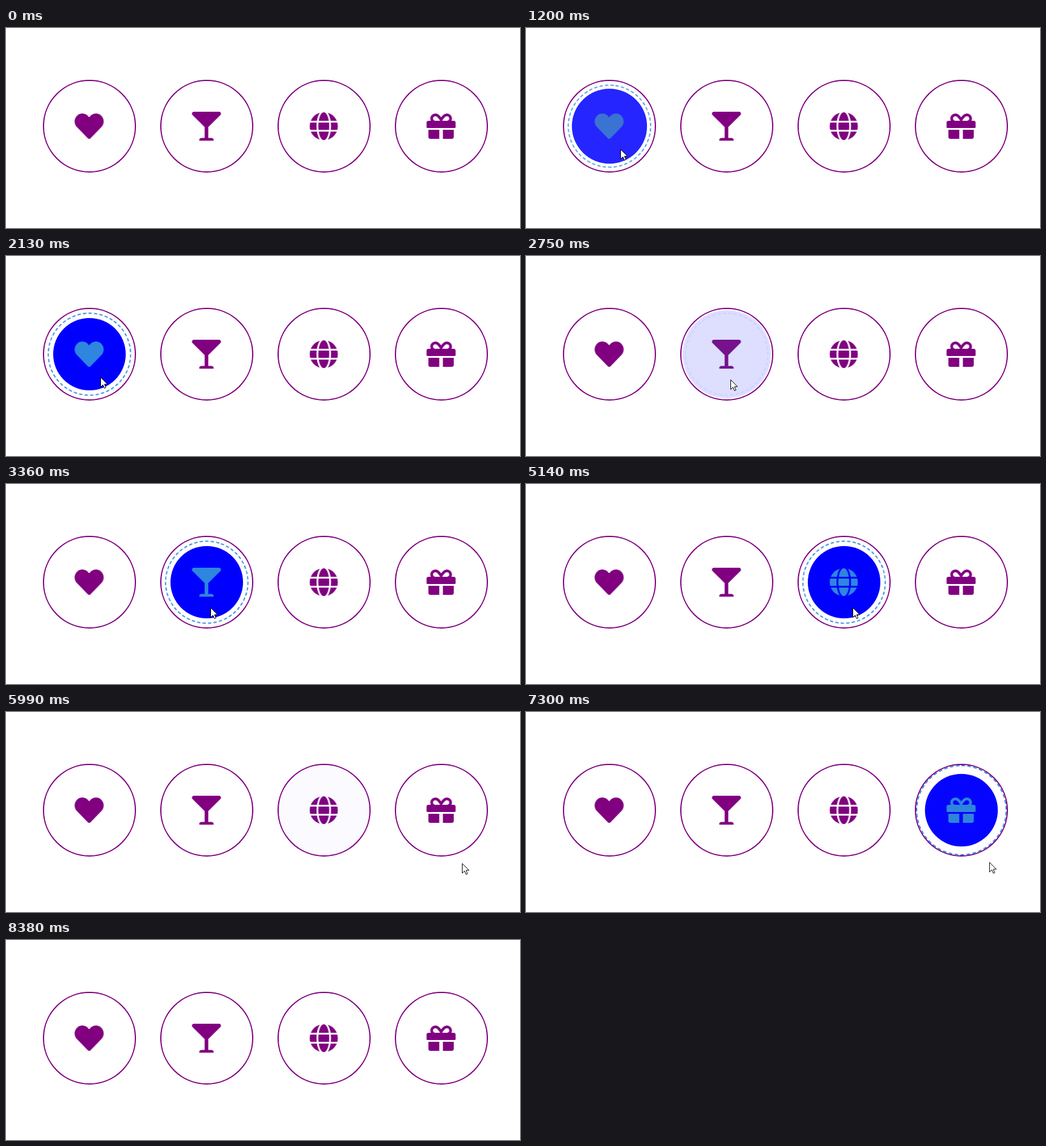
An HTML page that plays this animation: 850 by 332 pixels, repeating every 8.54 s.

```html
<!DOCTYPE html>
<html lang="en">
<head>
<meta charset="utf-8">
<title>Icon hover</title>
<style>
  html, body { margin: 0; width: 100%; height: 100%; overflow: hidden; background: #fff; }
  svg { display: block; }
  .border { fill: none; stroke: #800080; stroke-width: 2; }
  .disc { fill: #00f; r: 75px; opacity: 0; }
  .ring { fill: none; stroke: #2e86de; stroke-width: 2; stroke-dasharray: 6 3.893; opacity: 0; }
  .icon { fill: #800080; }
  .cursor { fill: #fff; stroke: #000; stroke-width: 1; }
</style>
</head>
<body>
<svg width="850" height="332" viewBox="0 0 850 332">
  <defs>
    <mask id="grid" maskUnits="userSpaceOnUse" x="0" y="0" width="512" height="512">
      <rect width="512" height="512" fill="#fff"/>
      <ellipse cx="256" cy="256" rx="128" ry="285"/>
      <ellipse cx="256" cy="256" rx="96" ry="248" fill="#fff"/>
      <path d="M0 176H512M0 336H512" stroke="#000" stroke-width="32"/>
    </mask>
  </defs>
  <g id="buttons"></g>
  <path class="cursor" id="cursor" d="M.5 .5V16.5L4.3 12.9 6.8 18.6 9.2 17.5 6.8 11.9H11.8Z"/>
</svg>
<script>
const LOOP = 8540, FADE = 500, SPIN = 12000;

const heart = `<path d="M462.3 62.6C407.5 15.9 326 24.3 275.7 76.2L256 96.5l-19.7-20.3C186.1 24.3 104.5 15.9 49.7 62.6
  c-62.8 53.6-66.1 149.8-9.9 207.9l193.5 199.8c12.5 12.9 32.8 12.9 45.3 0l193.5-199.8c56.3-58.1 53-154.3-9.8-207.9z"/>`;
const glass = `<path d="M502 57.6C523.3 36.3 508.2 0 478.2 0H33.8C3.8 0-11.3 36.3 10 57.6L224 271.6V464h-56
  c-22 0-40 18-40 40 0 4.4 3.6 8 8 8h240c4.4 0 8-3.6 8-8 0-22-18-40-40-40h-56V271.6z"/>`;
const globe = `<circle cx="256" cy="256" r="248" mask="url(#grid)"/>`;
const gift = `<path d="M32 448c0 17.7 14.3 32 32 32h160V320H32zM288 480h160c17.7 0 32-14.3 32-32V320H288z
  M480 160h-42.1c6.2-12.1 10.1-25.5 10.1-40 0-48.5-39.5-88-88-88-41.6 0-68.5 21.3-103 68.3-34.5-47-61.4-68.3-103-68.3
  -48.5 0-88 39.5-88 88 0 14.5 3.8 27.9 10.1 40H32c-17.7 0-32 14.3-32 32v80c0 8.8 7.2 16 16 16h480c8.8 0 16-7.2 16-16v-80
  c0-17.7-14.3-32-32-32zm-326.1 0c-22.1 0-40-17.9-40-40s17.9-40 40-40c19.9 0 34.6 3.3 86.1 80z
  m206.1 0h-86.1c51.4-76.5 65.7-80 86.1-80 22.1 0 40 17.9 40 40s-17.9 40-40 40z"/>`;

const buttons = [
  { icon: heart, enter: 920, leave: 2240 },
  { icon: glass, enter: 2690, leave: 4070 },
  { icon: globe, enter: 4510, leave: 5585 },
  { icon: gift, enter: 6295, leave: 7285 },
];

// Pointer moves; sag is how far a move bows below the straight line
const moves = [
  { start: 70, end: 870, x: 117, y: 262, sag: 9 },
  { start: 870, end: 1020, x: 156, y: 201, sag: 0 },
  { start: 2136, end: 2750, x: 338, y: 205, sag: 58 },
  { start: 3950, end: 4580, x: 540, y: 205, sag: 69 },
  { start: 5525, end: 5990, x: 754, y: 251, sag: 60 },
  { start: 5990, end: 6700, x: 747, y: 212, sag: 0 },
  { start: 7210, end: 7300, x: 766, y: 249, sag: 0 },
  { start: 7300, end: 7840, x: 819, y: 340, sag: 0 },
];

function play(el, steps) {
  const frames = steps.map(([time, style, easing = 'linear']) => ({ ...style, offset: time / LOOP, easing }));
  el.animate(frames, { duration: LOOP, iterations: Infinity });
}

function hover(el, { enter, leave }, off, on) {
  play(el, [
    [0, off], [enter, off, 'ease'], [enter + FADE, on],
    [leave, on, 'ease'], [leave + FADE, off], [LOOP, off],
  ]);
}

// The ring shrinks at once and turns steadily while hovered
function spin(el, { enter, leave }) {
  const pose = (angle, scale) => ({ transform: `rotate(${angle - 90}deg) scale(${scale})` });
  const rest = pose(0, 1);
  play(el, [
    [0, rest], [enter, rest],
    [enter, pose(0, .92)], [leave, pose((leave - enter) / SPIN * 360, .92)],
    [leave, rest], [LOOP, rest],
  ]);
}

function movePointer(el, from) {
  const place = (x, y) => ({ transform: `translate(${x}px, ${y}px)` });
  const hidden = place(from.x, 340);
  const steps = [[0, hidden], [moves[0].start, hidden]];
  const samples = 12;
  for (const to of moves) {
    for (let i = 0; i <= samples; i++) {
      const u = i / samples;
      const x = from.x + (to.x - from.x) * (1 - Math.cos(Math.PI * u)) / 2;
      const y = from.y + (to.y - from.y) * u + to.sag * Math.sin(Math.PI * u);
      steps.push([to.start + (to.end - to.start) * u, place(x, y)]);
    }
    from = to;
  }
  play(el, [...steps, [LOOP, place(from.x, from.y)]]);
}

const holder = document.getElementById('buttons');
holder.innerHTML = buttons.map(({ icon }, i) => `
  <g transform="translate(${138 + 194 * i} 163)">
    <circle class="disc"/>
    <circle class="border" r="76"/>
    <circle class="ring" r="74"/>
    <g class="icon" transform="translate(-24.5 -24) scale(.09375)">${icon}</g>
  </g>`).join('');

buttons.forEach((button, i) => {
  const part = name => holder.children[i].querySelector(name);
  hover(part('.disc'), button, { r: '75px', opacity: 0 }, { r: '60px', opacity: 1 });
  hover(part('.icon'), button, { fill: '#800080' }, { fill: '#2e86de' });
  hover(part('.ring'), button, { opacity: 0 }, { opacity: 1 });
  spin(part('.ring'), button);
});

movePointer(document.getElementById('cursor'), { x: 692, y: 322 });
</script>
</body>
</html>
```
